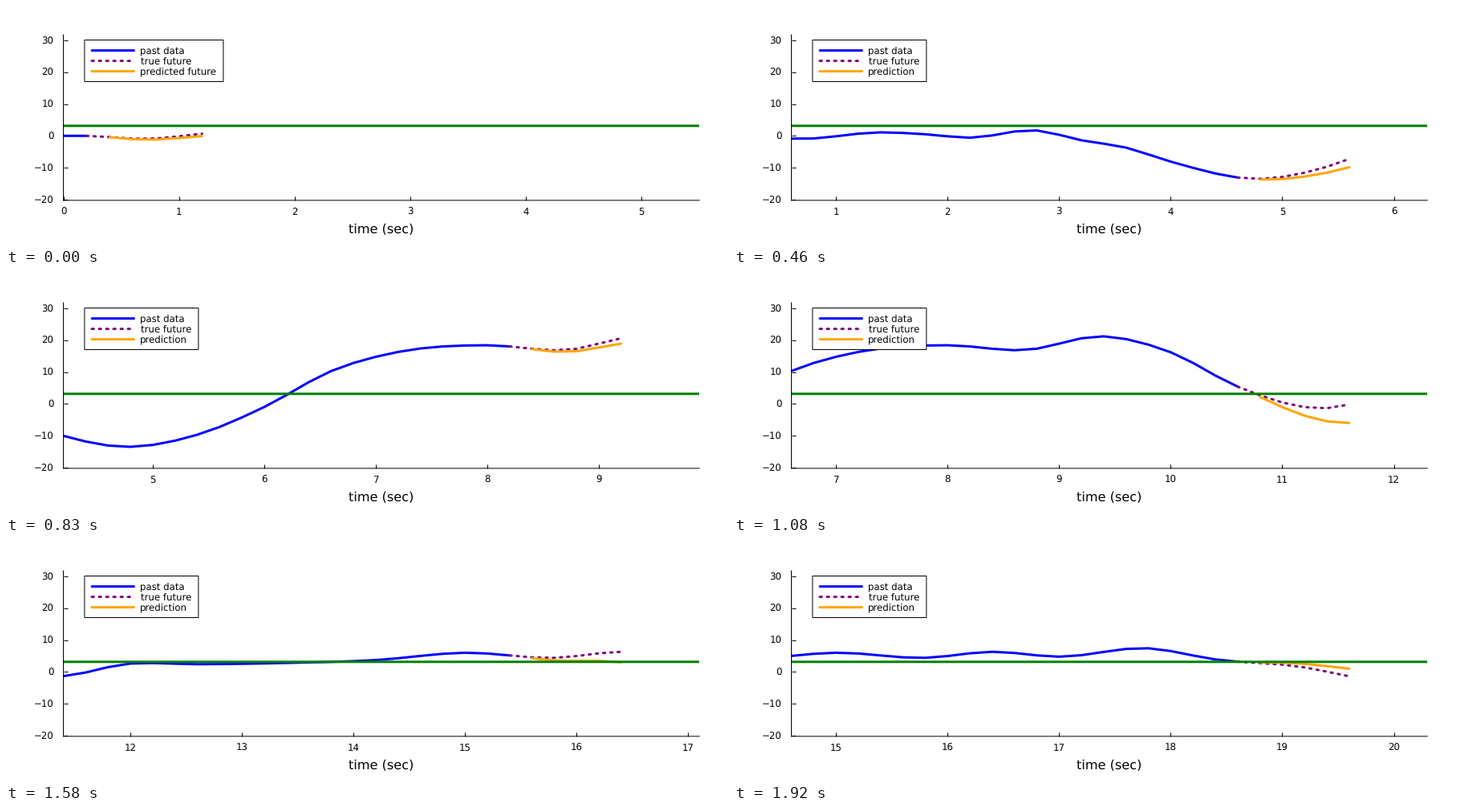
Write a matplotlib script that moves like this. It is 900 by 300 pixels and loops after 1960 ms.

```python
import matplotlib.pyplot as plt
import numpy as np
from matplotlib.animation import FuncAnimation
from matplotlib.patches import Rectangle

W, H, DPI = 900, 300, 100
PX = 72 / DPI                      # one pixel in points
LEFT, RIGHT, TOP, BOTTOM = 71.5, 864.3, 36, 242.9
Y_ZERO, Y_UNIT = 162.3, 3.98       # pixel row of zero, pixels per unit
SMALL, LARGE = 11.7 * PX, 16.15 * PX
DT, HORIZON, LEVEL = 0.2, 5, 3.14
FPS, TICK = 24, 10                 # pictures per second, timer step in ms

plt.rcParams.update({"font.family": "DejaVu Sans", "font.size": SMALL,
                     "axes.linewidth": PX, "path.snap": False,
                     "text.hinting": "none"})

# Turning points of the signal as (time, value)
turns = [(0, 0), (.2, 0), (.7, -.95), (1.4, 1.1), (1.8, .5), (2.2, -.6),
         (2.8, 1.7), (3.2, -1.4), (3.6, -3.7), (4, -8.1), (4.8, -13.5),
         (5.4, -9.7), (6, -1), (6.6, 10.3), (7.2, 16.3), (8, 18.4),
         (8.7, 16.9), (9.4, 21.2), (10, 16.2), (10.6, 5.4), (11.3, -1.4),
         (12, 2.6), (12.6, 2.4), (13.4, 2.8), (14.2, 3.7), (15, 6),
         (15.8, 4.4), (16.4, 6.3), (17, 4.75), (17.8, 7.4), (18.4, 3.9),
         (19.2, 1.4), (19.6, -1.4)]

# Forecast error at the far end of the horizon as (step, error)
drift = [(0, -.75), (7, 8.2), (15, -13.4), (16, 12.4), (19, -1),
         (26, -5.8), (33, -2.1), (38, -3.3), (46, 2.4)]


def smooth(t, points):
    """Cubic Hermite curve through the points."""
    x, y = np.array(points).T
    m = np.gradient(y, x)
    i = np.clip(np.searchsorted(x, t, "right") - 1, 0, len(x) - 2)
    h = x[i + 1] - x[i]
    u = (t - x[i]) / h
    rise = u * u * (3 - 2 * u)
    return (y[i] + (y[i + 1] - y[i]) * rise
            + h * u * (1 - u) * (m[i] * (1 - u) - m[i + 1] * u))


time = np.arange(99) * DT
signal = smooth(time, turns)
growth = (np.arange(1, HORIZON + 1) / HORIZON) ** 1.5


def curve(part):
    return time[part], signal[part]


fig = plt.figure(figsize=(W / DPI, H / DPI), dpi=DPI, facecolor="white")
ax = fig.add_axes([LEFT / W, 1 - BOTTOM / H, (RIGHT - LEFT) / W, (BOTTOM - TOP) / H])
ax.set_ylim((Y_ZERO - BOTTOM) / Y_UNIT, (Y_ZERO - TOP) / Y_UNIT)
ax.set_yticks(range(-20, 31, 10))
ax.spines[["top", "right"]].set_visible(False)
ax.spines[:].set_zorder(1)
ax.set_axisbelow(True)
ax.tick_params(direction="in", length=5 * PX, width=PX)
ax.tick_params(axis="x", pad=9.2 * PX)
ax.tick_params(axis="y", pad=12 * PX)

thick = dict(lw=3 * PX, solid_capstyle="round", solid_joinstyle="round",
             dash_capstyle="round", dash_joinstyle="round")
dotted = (0, (0.8, 2.2))
styles = [dict(color="blue", **thick),
          dict(color="purple", ls=dotted, **thick),
          dict(color="orange", **thick)]

past, future, forecast = [ax.plot([], [], zorder=3 + i, **s)[0]
                          for i, s in enumerate(styles)]
ax.axhline(LEVEL, color="green", lw=3 * PX, zorder=7)

# Overlay in pixel coordinates for the legend and axis title
over = fig.add_axes([0, 0, 1, 1], zorder=2)
over.set(xlim=(0, W), ylim=(H, 0))
over.axis("off")
over.text(468, 284, "time (sec)", size=LARGE, ha="center", va="baseline")
box = over.add_patch(Rectangle((97.9, 42.5), 173, 52, fc="white", ec="black",
                               lw=PX, zorder=1))
labels = []
for i, (name, x) in enumerate([("past data", 167), ("true future", 168),
                               ("predicted future", 167)]):
    y = 55.6 + 13 * i
    over.plot([107, 159.5], [y, y], zorder=2, **styles[i])
    labels.append(over.text(x, y + 4.4, name, va="baseline", zorder=3))


def draw(tick):
    step = int((tick + .5) * TICK * FPS / 1000 + 1e-9)
    n = 1 + 2 * step
    now = time[n]
    ahead = slice(n + 1, n + 1 + HORIZON)
    scrolling = now > 4
    lo, hi = (now - 4, now + 1.7) if scrolling else (0, 5.5)
    ax.set_xlim(lo, hi)
    ax.set_xticks(np.arange(np.ceil(lo - 1e-9), hi).astype(int))

    past.set_data(*curve(slice(0, n + 1)))
    future.set_data(*curve(slice(n, n + 1 + HORIZON)))
    error = np.interp(step, *np.array(drift).T)
    forecast.set_data(time[ahead], signal[ahead] + error * growth)

    labels[2].set_text("prediction" if scrolling else "predicted future")
    box.set_width(142 if scrolling else 173)
    return past, future, forecast


anim = FuncAnimation(fig, draw, frames=1960 // TICK, interval=TICK, repeat=True,
                     repeat_delay=0, blit=False)
plt.show()
```
